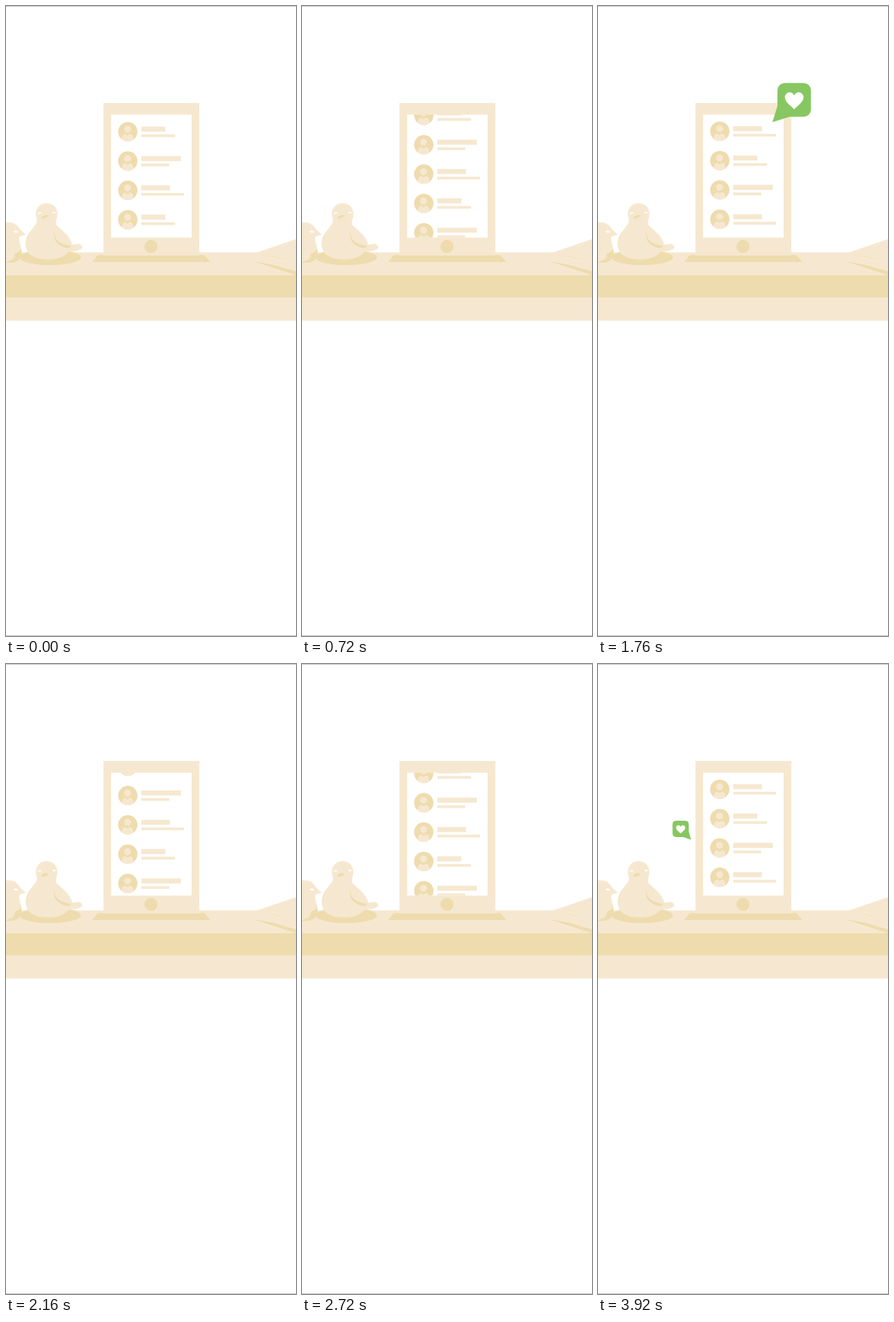
An HTML page that plays this animation: 375 by 812 pixels, repeating every 4 s.

```html
<!DOCTYPE html>
<html lang="en">
<head>
<meta charset="utf-8">
<title>Tablet on a desk</title>
<style>
  html, body { margin: 0; width: 100%; height: 100%; overflow: hidden; background: #fff; }
  svg { display: block; width: 375px; height: 812px; }
  .light { fill: #f6e8d0; }
  .gold { fill: #eedcae; }
  .white { fill: #fff; }
  .green { fill: #87c761; }
</style>
</head>
<body>
<svg viewBox="0 0 375 812" xmlns="http://www.w3.org/2000/svg">
  <defs>
    <clipPath id="screen"><rect x="136" y="140" width="104" height="158.5"/></clipPath>
    <clipPath id="disc"><circle r="12.5"/></clipPath>
    <g id="avatar">
      <circle class="gold" r="12.5"/>
      <g class="light" clip-path="url(#disc)">
        <circle cx="-.3" cy="-3.2" r="4.5"/>
        <path d="M-7.5 13V8.5Q-7.5 3-3 3L-.3 5L2.5 3Q7 3 7 8.5V13Z"/>
      </g>
    </g>
    <g id="bubble">
      <rect class="green" x="-21.7" y="-21.7" width="43.4" height="43.4" rx="9.5"/>
      <path class="green" d="M-21.7 8L-28.2 28.8L-6 21.7Z"/>
      <path class="white" d="M0 12.2C-4 8-12 3-12-3.2C-12-7.4-9-9.8-6-9.8C-3.2-9.8-1-8.2 0-5.6C1-8.2 3.2-9.8 6-9.8C9-9.8 12-7.4 12-3.2C12 3 4 8 0 12.2Z"/>
    </g>
  </defs>

  <rect class="white" width="375" height="812"/>
  <path d="M0 .5H375M0 811.5H375" stroke="#c9c9c9" fill="none"/>

  <!-- desk -->
  <rect class="light" y="317.5" width="375" height="88"/>
  <rect class="gold" y="347" width="375" height="28.5"/>
  <path class="light" d="M322 318.5L375 300.5V330H322Z"/>
  <path class="gold" d="M320 329L345 333.5L375 342V347Z"/>
  <path class="gold" d="M335 320.8L350 323.5L369 328.6Z"/>

  <!-- birds -->
  <ellipse class="gold" cx="57" cy="324" rx="40" ry="10"/>
  <path class="gold" d="M0 304H16Q21 312 20 321Q18 329 8 331H0Z"/>
  <path class="light" d="M0 279C8 278 15 281 18 288L25.500 294.500L17.500 297C16 302 19 306 19 312C19 316 16 318 11 319C13 323 9 328 0 330Z"/>
  <path class="white" d="M9.500 291Q13 287.500 16 291.500Q13 293 9.500 291Z"/>
  <path class="light" d="M77 309L94 306.500Q99 307.500 98.500 312Q96 316 81 317Z"/>
  <path class="light" d="M38.500 268A14 14 0 0 1 66.500 268C66.500 274 63.500 277 65 282C70 288 79 292 84.500 304C87 310 82 316 79 319C73 325 63 326.500 54 326.500C41 326.500 27 323 25.500 309C24.500 297 33 289 38.500 281C42 276 38.500 274 38.500 268Z"/>
  <path class="gold" d="M63.500 289C61 300 67 306 84 309.500Q83 312 79 312C66 309 59 301 63.500 289Z"/>
  <path class="gold" d="M35.500 287Q26 296 25.500 307Q28 295 35.500 287Z"/>
  <path class="gold" d="M46 271.500L51 269.500L56 270Q52 273.500 46.500 275Z"/>
  <path class="white" d="M40.500 267.500Q43 265 46.500 266.500Q44 268.500 40.500 267.500ZM59.500 266Q62 264.500 65 266Q62 268.500 59.500 266Z"/>

  <!-- tablet -->
  <path class="gold" d="M119 321H256.500L264.500 330H111Z"/>
  <rect class="light" x="126" y="125" width="124" height="196.500"/>
  <rect class="white" x="136" y="140" width="104" height="158.500"/>
  <circle class="gold" cx="187.500" cy="310" r="8.500"/>
  <g clip-path="url(#screen)"><g id="list"></g></g>

  <use id="right" href="#bubble"/>
  <use id="left" href="#bubble"/>
</svg>
<script>
  const LOOP = 4000, CYCLE = 2000, STEP = 80;
  const PITCH = 37.8, FIRST = 162;
  const NS = 'http://www.w3.org/2000/svg';
  const $ = id => document.getElementById(id);

  // title and subtitle widths, repeating down the list
  const BARS = [[31, 43.5], [51, 36], [37, 55]];
  // [ms, value]
  const SCROLL = [[0, 0], [400, 75.6], [720, 134.4], [1000, 189.6]];
  const POP = [[1000, 0], [1120, .62], [1200, .98], [1280, 1.04], [1480, 1.1],
               [1640, 1.08], [1760, 1], [1840, .8], [1920, .485], [2000, 0]];

  function add(parent, tag, attrs) {
    const el = document.createElementNS(NS, tag);
    for (const k in attrs) el.setAttribute(k, attrs[k]);
    return parent.appendChild(el);
  }

  function bar(row, y, width, height) {
    add(row, 'rect', { class: 'light', x: 175, y, width, height });
  }

  for (let i = 0; i < 9; i++) {
    const row = add($('list'), 'g', { transform: `translate(0 ${FIRST + i * PITCH})` });
    const [title, sub] = BARS[i % 3];
    add(row, 'use', { href: '#avatar', x: 157.5 });
    bar(row, -6.5, title, 6.5);
    bar(row, 3.4, sub, 3.5);
  }

  // smooth curve through the keys, held at both ends
  function curve(keys, t) {
    const n = keys.length - 1;
    if (t <= keys[0][0]) return keys[0][1];
    if (t >= keys[n][0]) return keys[n][1];
    const i = keys.findIndex(k => k[0] > t) - 1;
    const slope = j => {
      const a = keys[Math.max(j - 1, 0)], b = keys[Math.min(j + 1, n)];
      return (b[1] - a[1]) / (b[0] - a[0]);
    };
    const [t0, v0] = keys[i], [t1, v1] = keys[i + 1];
    const d = t1 - t0, x = (t - t0) / d, y = 1 - x;
    return y * y * ((1 + 2 * x) * v0 + x * d * slope(i))
         + x * x * ((3 - 2 * x) * v1 - y * d * slope(i + 1));
  }

  function place(el, x, y, flip, s) {
    el.setAttribute('visibility', s > .01 ? 'visible' : 'hidden');
    el.setAttribute('transform', `translate(${x} ${y}) scale(${flip * s} ${s})`);
  }

  function draw(ms) {
    // the motion advances in 80 ms steps
    const t = Math.floor((ms % LOOP + 2) / STEP) * STEP % LOOP;
    const u = t % CYCLE, s = curve(POP, u), second = t >= CYCLE;
    $('list').setAttribute('transform', `translate(0 ${-curve(SCROLL, u)})`);
    place($('right'), 253.7, 121, 1, second ? 0 : s);
    place($('left'), 106.9, 212.5, -1, second ? s : 0);
  }

  const start = performance.now();
  function tick() {
    draw(performance.now() - start);
    requestAnimationFrame(tick);
  }
  tick();
</script>
</body>
</html>
```
